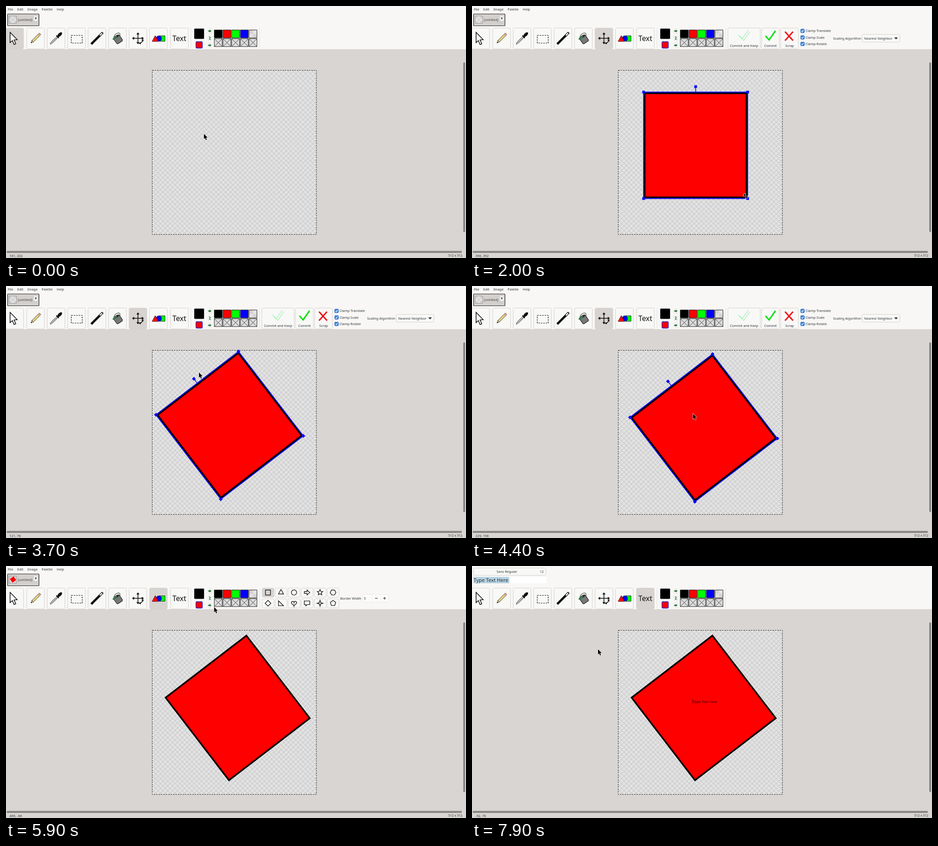
Recreate the animation shown at these times as an HTML page with a canvas. Size 1011 by 554 pixels, loop 8 s.

```html
<!DOCTYPE html>
<html lang="en">
<head>
<meta charset="utf-8">
<title>Image editor</title>
<style>
html, body { margin: 0; width: 1011px; height: 554px; overflow: hidden; background: #d8d5d2; }
canvas { display: block; }
</style>
</head>
<body>
<canvas id="stage" width="1011" height="554"></canvas>
<script>
const ctx = document.getElementById('stage').getContext('2d');
const { PI, cos, sin, floor } = Math;
const LOOP = 8000, STEP = 100;
const FONT = '"Noto Sans", "Open Sans", sans-serif';
const INK = '#2e3436', BLUE = '#0000ff', RED = '#ff0000', GREEN = '#00ff00';
const DOWN = '#d6d3d0', FACE = '#f8f8f7', EDGE = '#d6d1cd', HANDLE = '#0a0af5';
const DOC = { x: 321, y: 141, size: 361, zoom: 0.705 };
const CENTER = { x: 491.5, y: 306.3 };
const SELECT = 0, MOVE = 6, SHAPE = 7, TEXT = 8;

// Pointer moves: start, end, x, y. It rests in between.
const MOVES = [
  [100, 700, 335, 76],
  [800, 1200, 376.5, 188.6],
  [1300, 1700, 604.5, 422.5],   // draw the square
  [1800, 1900, 600.3, 417.8],
  [2100, 2700, 491.5, 177],
  [2700, 3500, 413, 204],       // rotate it
  [3500, 3600, 406.6, 195],
  [3600, 3700, 424, 190],
  [3700, 4000, 468, 275],
  [4000, 4400, 485.7, 280.7],   // shift it
  [4600, 4900, 684, 190],
  [4900, 5100, 652.3, 94.7],
  [5100, 5200, 652, 81],        // commit
  [5500, 6200, 331.2, 96.2],
  [6200, 6600, 372, 80],
  [6900, 7400, 486, 292],
  [7600, 7800, 284.7, 190.6],
  [7800, 7900, 277, 183]
];

const clamp = (v, a, b) => Math.min(b, Math.max(a, v));

function pointer(t) {
  let x = 435, y = t < 0 ? 283.7 : 281;
  for (const [a, b, tx, ty] of MOVES) {
    const u = clamp((t - a) / (b - a), 0, 1), e = u * u * (3 - 2 * u);
    x += (tx - x) * e;
    y += (ty - y) * e;
  }
  return { x, y };
}

function toolAt(t) {
  if (t < 700) return SELECT;
  if (t < 1700) return SHAPE;
  if (t < 5500) return MOVE;
  return t < 6900 ? SHAPE : TEXT;
}

// The readout keeps the last place seen outside the toolbar.
function readout(t) {
  let s = t - STEP;
  while (pointer(s).y < 94.5) s -= STEP;
  const p = pointer(s);
  return floor((p.x - DOC.x) / DOC.zoom) + ', ' + floor((p.y - DOC.y) / DOC.zoom);
}

function rect(x, y, w, h, fill) {
  ctx.fillStyle = fill;
  ctx.fillRect(x, y, w, h);
}

function paint(fill, stroke, lw = 1) {
  if (fill) { ctx.fillStyle = fill; ctx.fill(); }
  if (stroke) { ctx.strokeStyle = stroke; ctx.lineWidth = lw; ctx.stroke(); }
}

function box(x, y, w, h, fill, edge, r = 3, lw = 1) {
  ctx.beginPath();
  ctx.roundRect(x + 0.5, y + 0.5, w - 1, h - 1, r);
  paint(fill, edge, lw);
}

function oval(x, y, rx, ry, turn, fill, stroke, lw) {
  ctx.beginPath();
  ctx.ellipse(x, y, rx, ry, turn, 0, 2 * PI);
  paint(fill, stroke, lw);
}

function trace(pts, close) {
  ctx.beginPath();
  for (let i = 0; i < pts.length; i += 2) ctx.lineTo(pts[i], pts[i + 1]);
  if (close) ctx.closePath();
}

function poly(pts, ...style) {
  trace(pts, true);
  paint(...style);
}

function line(pts, color, lw) {
  trace(pts, false);
  paint(null, color, lw);
}

function cross(x, y, w, h, color, lw) {
  line([x, y, x + w, y + h], color, lw);
  line([x + w, y, x, y + h], color, lw);
}

function text(s, x, y, size = 7.4, align = 'left', color = INK, style = '') {
  ctx.font = `${style} ${size}px ${FONT}`;
  ctx.textAlign = align;
  ctx.fillStyle = color;
  ctx.fillText(s, x, y + size * 0.36);
  return ctx.measureText(s).width;
}

function at(x, y, turn, draw, scale = 1) {
  ctx.save();
  ctx.translate(x, y);
  ctx.rotate(turn);
  ctx.scale(scale, scale);
  draw();
  ctx.restore();
}

function dashed(on, off, draw) {
  ctx.setLineDash([on, off]);
  draw();
  ctx.setLineDash([]);
}

// Closed curve sampled from a function of the angle
function curve(n, f) {
  return Array.from({ length: n }, (_, i) => f(i * 2 * PI / n, i)).flat();
}

const ring = (n, r, turn = -PI / 2) => curve(n, a => [r * cos(a + turn), r * sin(a + turn)]);

const star = (n, r, inner) => curve(2 * n, (a, i) => {
  const d = i % 2 ? inner : r;
  return [d * sin(a), -d * cos(a)];
});

const heart = curve(40, a => [
  0.36 * 16 * sin(a) ** 3,
  -0.36 * (13 * cos(a) - 5 * cos(2 * a) - 2 * cos(3 * a) - cos(4 * a))
]);

const blockArrow = (l, h, w) => [-l, -w, 0, -w, 0, -h, l, 0, 0, h, 0, w, -l, w];
const ARROW = [0, 0, 0, 11.5, 2.6, 9.2, 4.5, 13.7, 6.4, 12.9, 4.5, 8.5, 8, 8.2];
const TICK = [-11, 1, -3, 10, 11, -10];

function checker(x, y, size, n) {
  const c = size / n;
  rect(x, y, size, size, '#e3e3e3');
  for (let j = 0; j < n; j++)
    for (let i = j % 2; i < n; i += 2) rect(x + i * c, y + j * c, c, c, '#d3d3d3');
}

const SLANT = -PI / 4;
const icons = [
  () => at(-10, -13, 0, () => poly(ARROW, '#fff', '#111', 0.8), 1.95),
  () => at(0, 0, SLANT, () => {
    poly([-14.5, 0, -9, -2.4, -9, 2.4], '#e8cfa0', '#333', 0.8);
    oval(-13, 0, 1.3, 0.8, 0, '#111');
    box(-9.5, -2.9, 24, 5.8, '#e6d47c', '#333', 0.5, 0.9);
    rect(9, -2, 4.6, 4, '#e79a9a');
  }),
  () => at(0, 0, SLANT, () => {
    oval(-6, 0, 12, 1.5, 0, '#eee', '#222', 1);
    box(3, -4.5, 3.5, 9, '#111', null, 1);
    oval(11.5, 0, 6.5, 3.4, 0, '#111');
  }),
  () => dashed(3.4, 2, () => {
    ctx.beginPath();
    ctx.rect(-11.5, -6.5, 24, 17);
    paint(null, '#111', 1.2);
  }),
  () => at(0, 0, SLANT, () => {
    rect(-18, -2.5, 36, 5, '#111');
    rect(9, -1.3, 7, 2.6, '#fff');
  }),
  () => {
    oval(-1, -5, 5, 8, 0.8, null, '#444', 1.2);
    at(1, 2, -0.6, () => box(-8, -7, 16, 16, '#777', '#222', 3, 1.2));
    oval(-2, -4, 7, 2.6, -0.55, '#333');
    oval(-6, -1, 6, 2.3, -0.7, '#2f7d4c');
  },
  () => {
    for (let i = 0; i < 4; i++) at(0, 0, i * PI / 2, () => {
      line([0, 0, 10, 0], '#111', 1.6);
      poly([13, 0, 8.5, -3.5, 8.5, 3.5], '#111');
    });
    ctx.beginPath();
    ctx.arc(2, 2, 9, 0.25, 1.35);
    paint(null, '#111', 1.5);
    at(10.5, 4.5, PI / 6, () => poly(ring(3, 3), '#111'));
    at(4.5, 11, -PI / 2, () => poly(ring(3, 3), '#111'));
  },
  () => {
    box(1, -6, 14, 13, GREEN, '#222', 0);
    oval(1, 0.5, 6, 6, 0, BLUE, '#113', 0.8);
    poly([-14, 7, -7, -6, 0, 7], RED, '#311', 0.8);
  },
  () => text('Text', 0, 0, 15.8, 'center', '#111')
];

const shapes = [
  ring(4, 7.8, PI / 4), ring(3, 6.5), ring(40, 5.7), blockArrow(6, 5.5, 2), star(5, 6.5, 2.8), ring(6, 6.3, 0),
  ring(4, 6.3), [-5.5, -5.5, 5.5, 5.5, -5.5, 5.5], heart,
  [-6, -5, 6, -5, 6, 3, 0, 3, -2.5, 6, -2.5, 3, -6, 3], star(4, 6.5, 2), ring(5, 6.2)
];

function button(x, y, w, h, p, on) {
  const over = p.x >= x && p.x < x + w && p.y >= y && p.y < y + h;
  box(x, y, w, h, on || over ? DOWN : FACE, EDGE);
}

function textHeader() {
  box(3, 4, 160, 17, FACE, EDGE);
  text('Sans Regular', 54, 12.7);
  text('12', 149, 12.7);
  rect(2, 24, 162, 14, '#fff');
  rect(3, 24, 79, 14, '#b8d4e3');
  text('Type Text Here', 3.5, 31, 11);
}

function menuHeader(done) {
  let x = 4;
  for (const s of ['File', 'Edit', 'Image', 'Palette', 'Help']) x += text(s, x, 7) + 9;
  box(3, 17, 70, 27, '#d3d0cd', '#222', 1, 1.2);
  checker(7, 22, 16, 3);
  if (done) at(15.4, 29.8, -0.65, () => rect(-5, -5, 10, 10, RED));
  box(6.5, 21.5, 17, 17, null, '#8a8a8a', 0, 0.8);
  text('[untitled]', 26, 30.5, 7.4, 'left', '#444');
  box(61, 22, 9, 11, FACE, '#e4e1de', 2);
  text('x', 65.4, 26.8, 7, 'center', '#111', 'bold');
}

function palette() {
  for (const x of [406.5, 557.5]) line([x, 48, x, 94], '#e6e3e0');
  box(413, 49, 23, 24, '#000', '#a9acb4', 2);
  box(417, 78, 15, 15, RED, '#1515d0', 2, 1.3);
  for (let i = 0; i < 3; i++) {
    const y = 55 + i * 15.7;
    box(443.5, y - 5.5, 9, 11, '#fff', '#dcdcdc', 2);
    if (i === 1) for (const d of [-2, 2])
      at(448, y + d, d < 0 ? 0.5 : PI + 0.5, () => poly(blockArrow(2.5, 2, 0.6), '#1d6a2a'));
    else at(448, y, 0, () => poly(blockArrow(3, 2.6, 1), '#3a9448', '#124d1b', 0.8));
  }
  ['#000', RED, GREEN, BLUE, null].forEach((c, i) => {
    const x = 457.8 + i * 19.1, w = 17.4;
    if (c) rect(x, 52.7, w, w, c);
    else checker(x, 52.7, w, 2);
    rect(x, 71.8, w, w, '#dcdcdc');
    cross(x, 71.8, w, w, '#333', 0.9);
    for (const y of [52.2, 71.3]) box(x - 0.5, y, w + 1, w + 1, null, '#222', 0);
  });
}

function shapePanel(p) {
  shapes.forEach((pts, i) => {
    const x = 562.5 + (i % 6) * 28.6, y = 48 + floor(i / 6) * 23.7;
    button(x, y, 27, 21, p, i === 0);
    at(x + 13.3, y + 10.2, 0, () => poly(pts, null, '#1a1a1a', 1.4));
  });
  text('Border Width', 734.5, 71);
  box(783, 62, 59, 18, '#fbfbfa', '#ece9e6');
  text('5', 786.5, 71);
  for (const x of [804.5, 823.5]) line([x, 63, x, 79], '#efedeb');
  for (const x of [814, 832]) line([x - 3, 71, x + 3, 71], INK, 1.2);
  line([832, 68, 832, 74], INK, 1.2);
}

function transformPanel(p) {
  const labels = [['Commit and Keep', 562, 72], ['Commit', 636, 40], ['Scrap', 678, 40]];
  for (const [s, x, w] of labels) {
    button(x, 48, w, 47, p);
    text(s, x + w / 2, 87, 7.4, 'center');
  }
  dashed(2, 1.3, () => {
    for (const d of [-1.5, 2]) at(598 + d, 64 + d, 0, () => line(TICK, '#2be04a', 1));
  });
  at(656, 64.5, 0, () => line(TICK, '#0fe00f', 3.2));
  cross(688, 56.5, 17.5, 19.5, '#f01414', 3.2);
  ['Translate', 'Scale', 'Rotate'].forEach((s, i) => {
    const y = 54.8 + i * 14.3;
    box(722, y - 4.5, 9, 9, '#3584e4', '#2a6cc0', 1.5);
    at(726.5, y, 0, () => line(TICK, '#fff', 6), 0.21);
    text('Clamp ' + s, 733, y);
  });
  text('Scaling Algorithm', 793.7, 71);
  box(857, 62, 84, 18, FACE, EDGE);
  text('Nearest Neighbor', 862, 71);
  poly([928, 69, 936, 69, 932, 73.5], INK);
}

function bordered(x, y, w, h) {
  const b = 5 * DOC.zoom;
  rect(x, y, w, h, '#000');
  rect(x + b, y + b, Math.max(0, w - 2 * b), Math.max(0, h - 2 * b), RED);
}

function drawShape(t) {
  if (t < 1400) return;
  if (t < 1700) {
    const a = pointer(1300), b = pointer(t);
    bordered(a.x, a.y, b.x - a.x, b.y - a.y);
    return;
  }
  const grip = pointer(clamp(t, 2700, 3500));
  const turn = Math.atan2(grip.x - CENTER.x, CENTER.y - grip.y);
  const from = pointer(4000), to = pointer(clamp(t, 4000, 4400));
  at(CENTER.x + to.x - from.x, CENTER.y + to.y - from.y, turn, () => {
    const w = 114.3, h = 117;
    bordered(0.6 - w, 0.8 - h, 2 * w - 1.2, 2 * h - 1.6);
    if (t >= 5500) return;
    ctx.strokeStyle = HANDLE;
    ctx.lineWidth = 2;
    ctx.strokeRect(-w, -h, 2 * w, 2 * h);
    line([0, -h, 0, -129], HANDLE, 1.6);
    for (const x of [-w, w]) for (const y of [-h, h]) rect(x - 3, y - 3, 6, 6, HANDLE);
    rect(-3, -132, 6, 6, HANDLE);
  });
}

function drawPointer(t, p) {
  ctx.lineJoin = 'round';
  if (t >= 1700 && t <= 2000) {
    for (const d of [0, PI]) at(p.x + 1, p.y, PI / 4 + d, () =>
      at(3, 0, 0, () => poly(blockArrow(3.5, 4.5, 1.4), '#000', '#fff', 0.7)));
  } else {
    at(p.x, p.y, 0, () => {
      poly(ARROW, null, '#fff', 1.2);
      poly(ARROW, '#000');
    });
  }
  ctx.lineJoin = 'miter';
}

function draw(t) {
  const p = pointer(t), tool = toolAt(t);
  rect(0, 0, 1011, 554, '#d8d5d2');
  rect(0, 0, 1011, 95, '#f8f7f5');
  if (t >= 7700) textHeader();
  else menuHeader(t >= 5500);

  icons.forEach((icon, i) => {
    const x = Math.round(i * 45.15 - 0.6);
    button(x, 48, 40, 47, p, i === tool);
    at(x + 20, 71, 0, icon);
  });
  palette();
  if (tool === SHAPE) shapePanel(p);
  if (tool === MOVE) transformPanel(p);

  checker(DOC.x, DOC.y, DOC.size, 68);
  dashed(3.2, 2.1, () => box(DOC.x - 0.1, DOC.y - 0.1, DOC.size + 0.8, DOC.size + 0.8, null, '#222', 0));
  drawShape(t);
  if (t >= 7700) {
    text('Type Text Here', 486, 298, 7.6, 'left', '#200');
    line([485, 293, 485, 303], '#200', 0.8);
  }

  box(1004.5, 123.5, 5, 374, '#858483', null, 2);
  box(1, 538, 1001.5, 5.2, '#858483', null, 2);
  text(readout(t), 7.5, 549);
  text('512 x 512', 1003, 549, 6.9, 'right');
  drawPointer(t, p);
}

function tick() {
  draw(floor(performance.now() % LOOP / STEP) * STEP);
  requestAnimationFrame(tick);
}
tick();
</script>
</body>
</html>
```
